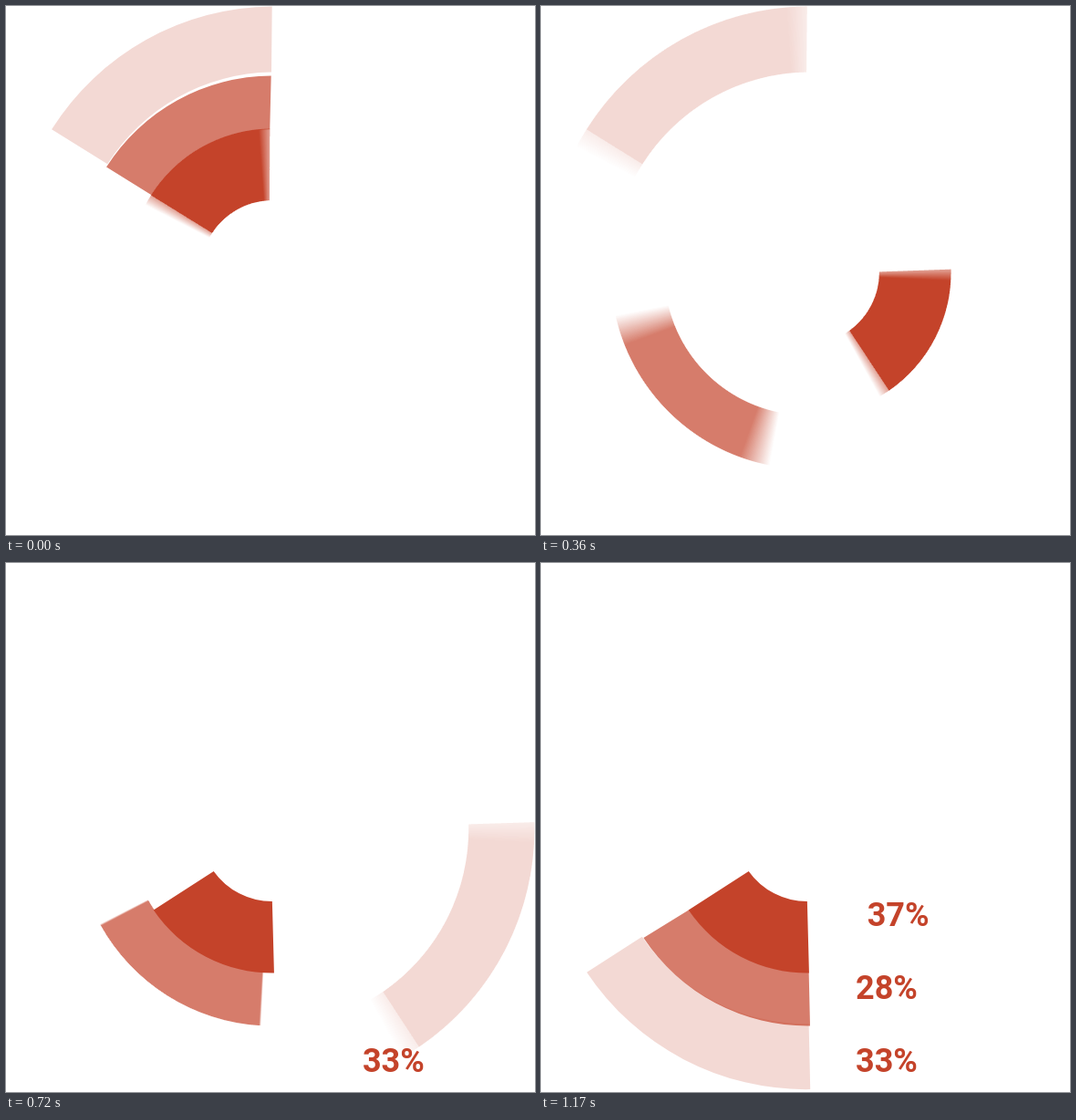
Animation of 580 by 580 pixels, one loop 1200 ms. Source, as an HTML page with a canvas:

```html
<!DOCTYPE html>
<html lang="en">
<head>
<meta charset="utf-8">
<title>Ring chart</title>
<style>
  html, body { margin: 0; width: 100%; height: 100%; overflow: hidden; background: #fff; }
  canvas, svg { position: absolute; left: 0; top: 0; width: 580px; height: 580px; }
  text { font: 700 36px Roboto, sans-serif; fill: #c4432a; }
</style>
</head>
<body>
<canvas id="stage" width="580" height="580"></canvas>
<svg viewBox="0 0 580 580">
  <text y="397.5">37%</text>
  <text y="477.5">28%</text>
  <text y="557.5">33%</text>
</svg>
<script>
const LOOP = 1200, STEP = 30, SIZE = 580;
const SHUTTER = 15, SAMPLES = 51;
const COLOR = '#c4432a';

// Angles are degrees counter-clockwise from the top: [start, end] of each arc.
const rings = [
  { delay: 360, alpha: 0.2, pivot: [292.1, 289.9], shift: [2.1, -0.9],
    r: [288.5, 216.5], outer: [0.5, 57.8], inner: [0.85, 57.7] },
  { delay: 180, alpha: 0.695, pivot: [292, 292], shift: [0, 0],
    r: [215.5, 156.8], outer: [0.35, 57.6], inner: [1, 57.4] },
  { delay: 0, alpha: 1, pivot: [292, 292], shift: [0, 0],
    r: [157.5, 79], outer: [1, 57.5], inner: [2.3, 56.7] }
];

// [time, value] keys, linear in between
const turn = [[0, 0], [360, 213.7], [420, 213.7], [480, 122.7], [540, 118.5], [600, 123.2]];
const slide = [[0, 345], [90, 384], [240, 395.5], [280, 345]];
const fade = [[0, 0], [90, 1]];
const labelDelays = [900, 720, 540];

const ctx = document.getElementById('stage').getContext('2d');
const layer = document.createElement('canvas');
layer.width = layer.height = SIZE;
const pen = layer.getContext('2d');
const labels = document.querySelectorAll('text');

function at(keys, t) {
  if (t <= keys[0][0]) return keys[0][1];
  for (let i = 1; i < keys.length; i++) {
    const [t0, v0] = keys[i - 1], [t1, v1] = keys[i];
    if (t < t1) return v0 + (v1 - v0) * (t - t0) / (t1 - t0);
  }
  return keys[keys.length - 1][1];
}

const rad = deg => deg * Math.PI / 180;
const dir = deg => rad(-90 - deg);

function wedgePath({ shift: [x, y], r, outer, inner }) {
  const p = new Path2D();
  p.arc(x, y, r[0], dir(outer[0]), dir(outer[1]), true);
  p.arc(x, y, r[1], dir(inner[1]), dir(inner[0]), false);
  p.closePath();
  return p;
}
rings.forEach(ring => { ring.path = wedgePath(ring); });

function stamp(ring, angle) {
  pen.setTransform(1, 0, 0, 1, ring.pivot[0], ring.pivot[1]);
  pen.rotate(-rad(angle));
  pen.fill(ring.path);
}

// Averages the wedge over the shutter time, then tints the mask.
function drawRing(ring, t) {
  const local = t - ring.delay, half = SHUTTER / 2;
  pen.setTransform(1, 0, 0, 1, 0, 0);
  pen.clearRect(0, 0, SIZE, SIZE);
  pen.fillStyle = '#000';
  if (at(turn, local - half) === at(turn, local + half)) {
    stamp(ring, at(turn, local));
  } else {
    pen.globalCompositeOperation = 'lighter';
    pen.globalAlpha = 1 / SAMPLES;
    for (let i = 0; i < SAMPLES; i++) {
      stamp(ring, at(turn, local + SHUTTER * (i / (SAMPLES - 1) - 0.5)));
    }
  }
  pen.setTransform(1, 0, 0, 1, 0, 0);
  pen.globalAlpha = 1;
  pen.globalCompositeOperation = 'source-in';
  pen.fillStyle = COLOR;
  pen.fillRect(0, 0, SIZE, SIZE);
  pen.globalCompositeOperation = 'source-over';
  ctx.globalAlpha = ring.alpha;
  ctx.drawImage(layer, 0, 0);
}

function render(t) {
  ctx.clearRect(0, 0, SIZE, SIZE);
  rings.forEach(ring => drawRing(ring, t));
  labels.forEach((label, i) => {
    const local = t - labelDelays[i];
    label.setAttribute('x', at(slide, local).toFixed(2));
    label.setAttribute('opacity', at(fade, local).toFixed(3));
  });
}

let start = null, last = -1;
function tick(now) {
  if (start === null) start = now;
  const t = Math.floor((now - start) % LOOP / STEP) * STEP;
  if (t !== last) render(last = t);
  requestAnimationFrame(tick);
}
render(0);
requestAnimationFrame(tick);
</script>
</body>
</html>
```
